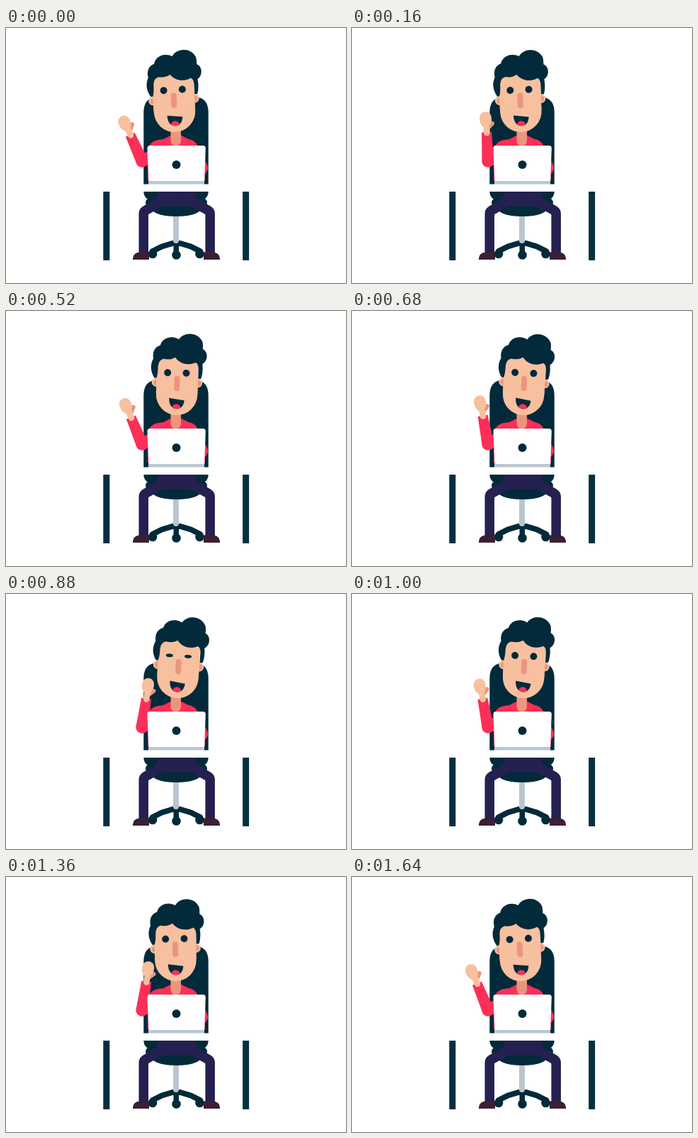
Animation of 480 by 360 pixels, one loop 1.68 s. Source, as an HTML page:

```html
<!DOCTYPE html>
<html lang="en">
<head>
<meta charset="utf-8">
<title>Waving at the desk</title>
<style>
  html, body { margin: 0; width: 100%; height: 100%; overflow: hidden; background: #fff; }
  svg { display: block; width: 100vw; height: 100vh; }
  .dark { fill: #022a3a; }
  .red { fill: #fb2f57; }
  .skin { fill: #f7c09f; }
  .shade { fill: #eb957d; }
  .pants { fill: #242050; }
  .shoe { fill: #3a2032; }
  .metal { fill: #bac6d0; }
  .line { fill: none; stroke-linecap: round; stroke-linejoin: round; }
</style>
</head>
<body>
<svg viewBox="0 0 480 360">
  <defs>
    <clipPath id="lips"><path id="mouth" d="M229.500 123 L251 126 C250.500 134 246 138.300 240.500 138.300 C233 138 229.500 132 229.500 123Z"/></clipPath>
    <path id="leg" class="pants" d="M242 231 H214 Q216 238 210 242 L193 252 Q187.500 255.500 187.500 262 V318 H201 V264 Q201 262.500 203 262 L222 251.500 H242Z"/>
    <path id="shoe" class="shoe" d="M179 327 Q179 316.500 190 316.500 H202 V327Z"/>
    <rect id="post" x="137.300" y="231" width="9" height="97" fill="#06303f"/>
  </defs>

  <!-- chair -->
  <path class="dark" d="M194.300 119 Q194.300 97 216 97 H264 Q285.700 97 285.700 119 V231 Q285 243 273 243 H207 Q195 243 194.300 231Z"/>
  <rect class="dark" x="197" y="240" width="87" height="13" rx="6.500"/>
  <path class="dark" d="M203 250 H278 Q276 266 240.500 266 Q205 266 203 250Z"/>
  <path class="line" stroke="#022a3a" stroke-width="8" d="M207 315 L220 308.500 L235 304 H246 L261 308.500 L274 315"/>
  <rect class="dark" x="236.500" y="300" width="7.500" height="20"/>
  <circle class="dark" cx="207" cy="319" r="6.300"/>
  <circle class="dark" cx="240.500" cy="320.500" r="6.300"/>
  <circle class="dark" cx="273.500" cy="319" r="6.300"/>
  <path class="metal" d="M236 266 H244 V300 A4 4 0 0 1 236 300Z"/>

  <!-- legs and table legs -->
  <use href="#leg"/>
  <use href="#leg" transform="matrix(-1 0 0 1 482.400 0)"/>
  <use href="#shoe"/>
  <use href="#shoe" transform="matrix(-1 0 0 1 481 0)"/>
  <use href="#post"/>
  <use href="#post" x="196.800"/>

  <!-- body -->
  <path class="red" d="M200 215 V172 C204 159 212 158 222 157 L232 152 H248 L258 157 C266 158 270 164 273 171 L283 191 Q288 199 281 206 V215Z"/>
  <path class="shade" d="M232.500 138 H247 V159 A7.250 7.250 0 0 1 232.500 159Z"/>

  <g id="head">
    <circle class="skin" cx="211" cy="101" r="6.500"/>
    <circle class="skin" cx="269.500" cy="101" r="6.500"/>
    <circle class="shade" cx="211.500" cy="101.500" r="4.500"/>
    <circle class="shade" cx="269.500" cy="101.500" r="4.500"/>
    <rect class="skin" x="211" y="64" width="58.500" height="83" rx="29.250"/>
    <rect class="skin" x="211" y="64" width="58.500" height="52"/>
    <path class="dark" d="M208 95 C203 87 201 78 206 68 C204 57 209 51 215.500 49 C218 38 232 34 241.500 40 C248 29 268 28 275 43 Q276 48 275.500 53 C284 57 283 70 275.500 74 Q277 86 274 95 H270 V81 Q270 74 266 72 C256 77 244 75 237 65.500 Q230 70 221 68 Q214 69 213 78 Q213 90 211 95Z"/>
    <ellipse class="dark eye" cx="226.700" cy="87.300" rx="5" ry="5"/>
    <ellipse class="dark eye" cx="253" cy="87.300" rx="5" ry="5"/>
    <rect class="shade" x="236.200" y="91.500" width="8" height="21.500" rx="4"/>
    <use href="#mouth" class="dark"/>
    <circle class="red" cx="240" cy="137.500" r="6.300" clip-path="url(#lips)"/>
  </g>

  <!-- waving arm -->
  <path class="line" stroke="#fb2f57" stroke-width="17" d="M192 188 L215 176"/>
  <g id="arm">
    <path class="red" d="M-7 -41 H7 L8.500 0 A8.500 8.500 0 0 1 -8.500 0Z"/>
    <path class="line" stroke="#eb957d" stroke-width="6" d="M2 -46.500 L8.500 -53"/>
    <path class="skin" d="M-9 -60 C-9 -73 8 -73 8 -60 Q8 -54 4.500 -50 V-40 A4 4 0 0 1 -4 -40 V-48 Q-9 -52 -9 -60Z"/>
  </g>

  <!-- laptop and table top -->
  <path fill="#fff" d="M203 166 H278 Q282 166 281.800 170 L280 219 H201.500 L199.500 170 Q199.500 166 203 166Z"/>
  <path class="metal" d="M201 216 H280 V221 H201Z"/>
  <circle class="dark" cx="240.500" cy="193" r="6"/>
  <rect x="137" y="220.500" width="206" height="10.500" fill="#fff"/>
</svg>
<script>
  const LOOP = 1680, WAVES = 3, BLINK_AT = 840, BLINK_HALF = 120;
  const head = document.getElementById('head');
  const arm = document.getElementById('arm');
  const eyes = document.querySelectorAll('.eye');

  function draw() {
    const t = performance.now() % LOOP;
    const phase = 2 * Math.PI * t / LOOP;
    const tilt = -3.5 * Math.cos(phase);
    const swing = -6.8 - 17.2 * Math.cos(WAVES * phase);
    const open = Math.min(1, Math.abs(t - BLINK_AT) / BLINK_HALF);

    head.setAttribute('transform', `rotate(${tilt} 239 155)`);
    arm.setAttribute('transform', `translate(192 188) rotate(${swing})`);
    eyes.forEach(eye => eye.setAttribute('ry', 1 + 4 * open));
    requestAnimationFrame(draw);
  }
  draw();
</script>
</body>
</html>
```
